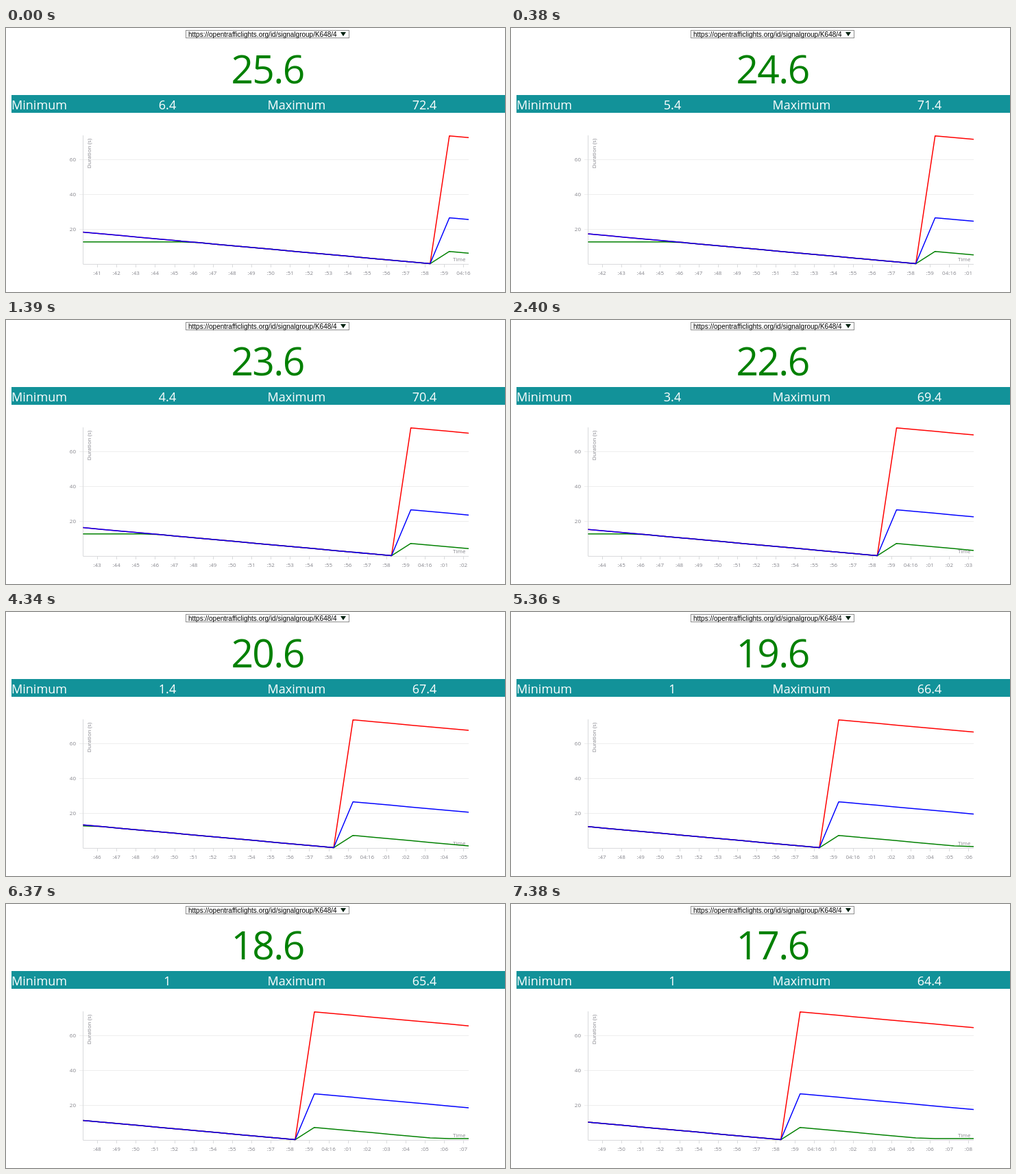
An HTML page for the animation above (8000 ms loop, 728 by 386 pixels).

```html
<!DOCTYPE html>
<html lang="en">
<head>
<meta charset="utf-8">
<title>Signal group countdown</title>
<style>
  html, body { margin: 0; width: 100%; height: 100%; overflow: hidden; background: #fff; }
  svg { display: block; width: 728px; height: 386px; font-family: "Open Sans", "Noto Sans", sans-serif; }
  .mid { text-anchor: middle; }
  .url { font: 10px "Liberation Sans", Arial, sans-serif; }
  .big { font-size: 57px; letter-spacing: -1.7px; fill: #008000; }
  .bar { font-size: 18px; fill: #fff; }
  .axis { font-size: 8px; fill: #85858c; }
  .grid { stroke: #eee; }
  .frame { stroke: #d9dadc; fill: none; }
  .line { fill: none; stroke-width: 1.5; stroke-linejoin: round; }
</style>
</head>
<body>
<svg viewBox="0 0 728 386">
  <rect x="262.5" y="3.5" width="238" height="11" fill="#fff" stroke="#8e8e8e"/>
  <text class="url" x="266" y="12.7">https://opentrafficlights.org/id/signalgroup/K648/4</text>
  <path d="M488 6h8l-4 6z" fill="#021"/>

  <text class="big mid" id="avg" x="381.5" y="80.5"></text>

  <rect x="8" y="98" width="720" height="26" fill="#129299"/>
  <g class="bar">
    <text x="8" y="119">Minimum</text>
    <text class="mid" id="min" x="235.5" y="119"></text>
    <text x="381.5" y="119">Maximum</text>
    <text class="mid" id="max" x="610.5" y="119"></text>
  </g>

  <g id="grid"></g>
  <path class="frame" d="M112.5 157V345.5H675"/>
  <g class="axis">
    <text class="mid" transform="translate(124.3 183.5) rotate(-90)">Duration (s)</text>
    <text x="652" y="341">Time</text>
    <g id="ticks"></g>
  </g>
  <path class="line" id="green" stroke="#008000"/>
  <path class="line" id="red" stroke="#f00"/>
  <path class="line" id="blue" stroke="#00f"/>
</svg>
<script>
  const LOOP = 8000;
  const changes = [380, 1390, 2400, 3410, 4340, 5360, 6370, 7380];
  const STEP = 28.13, LEFT = 112.4, SPAN = 20;

  const $ = id => document.getElementById(id);
  const yOf = v => 345.6 - 2.56 * v;

  function add(parent, tag, attrs, text = '') {
    const el = document.createElementNS('http://www.w3.org/2000/svg', tag);
    for (const name in attrs) el.setAttribute(name, attrs[name]);
    el.textContent = text;
    return parent.appendChild(el);
  }

  for (const v of [20, 40, 60]) {
    const y = Math.floor(yOf(v)) + 0.5;
    add($('grid'), 'path', { class: 'grid', d: `M107 ${y}H675` });
    add($('ticks'), 'text', { x: 102, y: y + 2.7, 'text-anchor': 'end' }, v);
  }

  const labels = Array.from({ length: SPAN }, (_, i) => {
    const x = 133 + i * STEP;
    add($('grid'), 'path', { class: 'frame', d: `M${Math.round(x) + 0.5} 345v5` });
    return add($('ticks'), 'text', { class: 'mid', x, y: 361 });
  });

  // Seconds count from the switch at 0; the new phase starts at 1.
  const before = s => 0.4 - s;
  const series = {
    green: s => s > 0 ? Math.max(1, 8.4 - s) : Math.min(12.8, before(s)),
    red: s => s > 0 ? 74.4 - s : before(s),
    blue: s => s > 0 ? 27.6 - s : before(s)
  };

  function plot(fn, first) {
    const points = [];
    for (let i = 0; i <= SPAN; i++) {
      points.push(`${(LEFT + i * STEP).toFixed(2)} ${yOf(fn(first + i)).toFixed(2)}`);
    }
    return 'M' + points.join('L');
  }

  function clock(sec) {
    if (sec === 60) return '04:16';
    return ':' + String(sec % 60).padStart(2, '0');
  }

  function show(n) {
    const now = n + 2;
    const value = name => String(+series[name](now).toFixed(1));
    $('avg').textContent = value('blue');
    $('min').textContent = value('green');
    $('max').textContent = value('red');
    for (const name in series) $(name).setAttribute('d', plot(series[name], now - SPAN));
    labels.forEach((el, i) => { el.textContent = clock(41 + n + i); });
  }

  const start = performance.now();
  let shown = -1;

  function tick() {
    const t = (performance.now() - start) % LOOP;
    const n = changes.filter(c => c <= t).length;
    if (n !== shown) show(shown = n);
    requestAnimationFrame(tick);
  }
  tick();
</script>
</body>
</html>
```
